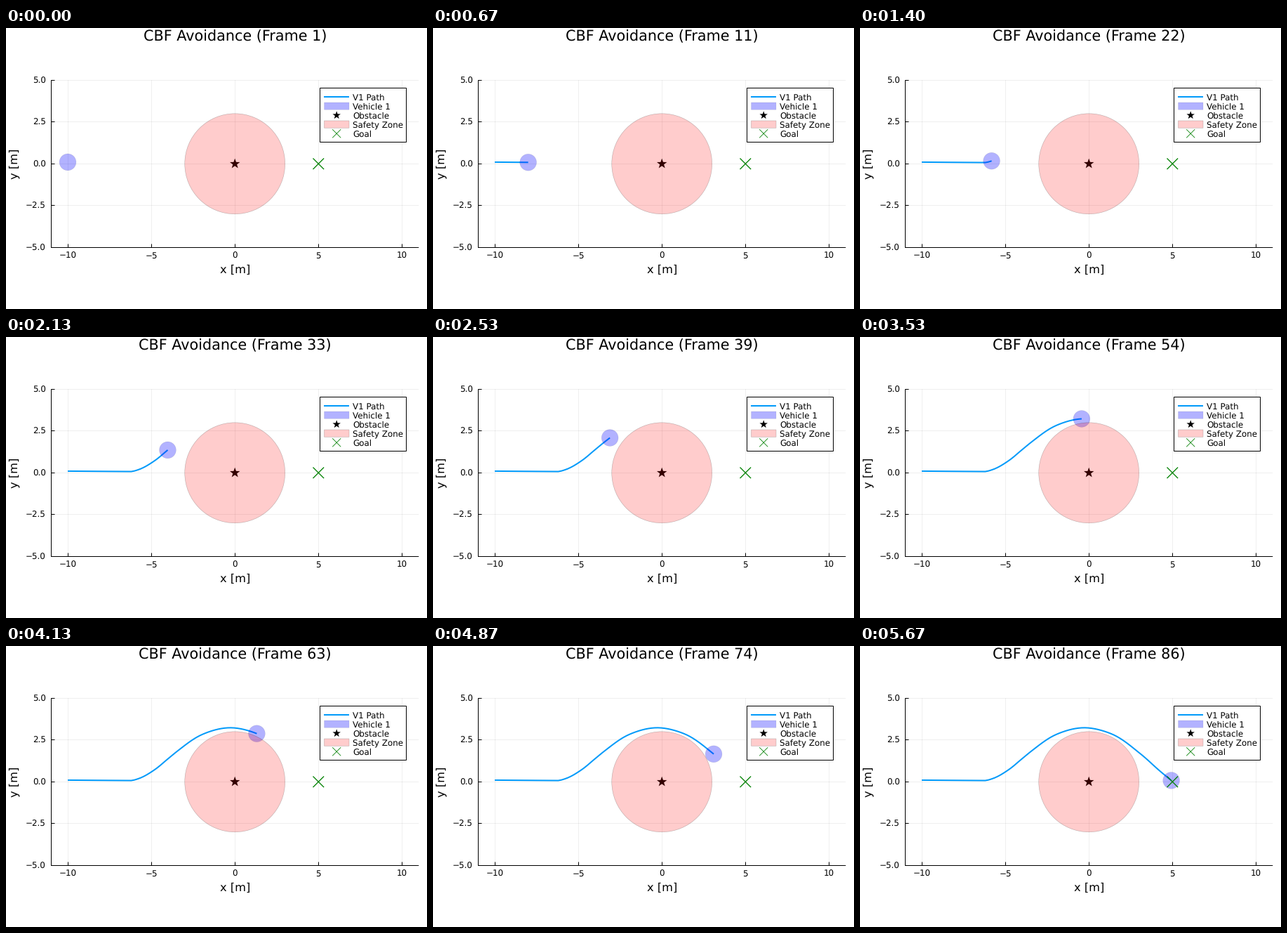
A matplotlib script for the animation above (5740 ms loop, 600x400 px).

```python
import numpy as np
import matplotlib.pyplot as plt
from matplotlib.animation import FuncAnimation
from matplotlib.patches import Circle, Polygon, Rectangle

plt.rcParams.update({"font.family": "DejaVu Sans", "path.snap": False,
                     "text.hinting": "none"})

W, H, DPI = 600, 400, 100
X0, Y0, S = 326.2, 193.3, 23.82      # plot origin and pixels per metre
STEPS, FPS = 86, 15
LOOP, TICK = 5740, 20                # ms
PX = 72 / DPI                        # one pixel in points
BLUE, GREEN = "#009afa", "#008000"

# Vehicle track: step, x, y
KNOTS = np.array([
    (0, -10, .1), (18, -6.4, .076), (19, -6.2, .075), (21, -5.82, .17),
    (27, -4.79, .73), (32, -4.02, 1.36), (36, -3.42, 1.85),
    (45, -1.95, 2.83), (54, -.24, 3.23), (62, 1.31, 2.88),
    (73, 3.1, 1.66), (81, 4.3, .60), (85, 4.93, .08)])


def hermite(t, knots, vals):
    """Smooth curve through the knots with finite-difference slopes."""
    m = np.gradient(vals, knots)
    i = np.clip(np.searchsorted(knots, t, "right") - 1, 0, len(knots) - 2)
    h = knots[i + 1] - knots[i]
    u = (t - knots[i]) / h
    return ((1 + 2 * u) * (1 - u) ** 2 * vals[i] + u * (1 - u) ** 2 * h * m[i]
            + u * u * (3 - 2 * u) * vals[i + 1]
            + u * u * (u - 1) * h * m[i + 1])


def sx(x):
    return X0 + S * x


def sy(y):
    return Y0 - S * y


def mid(v):
    return np.floor(v) + .5


steps = np.arange(STEPS)
track_x = sx(hermite(steps, KNOTS[:, 0], KNOTS[:, 1]))
track_y = sy(hermite(steps, KNOTS[:, 0], KNOTS[:, 2]))

fig = plt.figure(figsize=(W / DPI, H / DPI), dpi=DPI, facecolor="white")
ax = fig.add_axes([0, 0, 1, 1])
ax.set(xlim=(0, W), ylim=(H, 0))
ax.axis("off")


def line(xs, ys, color="black", w=1.0, z=1, **kw):
    kw.setdefault("solid_capstyle", "butt")
    return ax.plot(xs, ys, color=color, lw=w * PX, zorder=z, **kw)[0]


def text(x, y, s, size, ha="center", **kw):
    return ax.text(x, y, s, fontsize=size * PX, ha=ha,
                   va=kw.pop("va", "baseline"), zorder=12, **kw)


def star(x, y, r, z):
    a = np.arange(10) * np.pi / 5
    rad = np.where(np.arange(10) % 2, .4 * r, r)
    pts = np.column_stack([x + rad * np.sin(a), y - rad * np.cos(a)])
    ax.add_patch(Polygon(pts, fc="black", ec="none", zorder=z))


def cross(x, y, r, w, z):
    for d in (r, -r):
        line([x - r, x + r], [y - d, y + d], GREEN, w, z)


def shade(patch, fill, edge, z):
    patch.set(facecolor=fill, edgecolor=(0, 0, 0, edge), linewidth=.6 * PX,
              zorder=z)
    return ax.add_patch(patch)


VEHICLE = ((0, 0, 1, .3), .1)
ZONE = ((1, 0, 0, .2), .25)

# Axes, grid and tick labels
left, right = mid(sx(-11)), sx(11)
top, bottom = sy(5), mid(sy(-5))
for v in (-10, -5, 0, 5, 10):
    x = mid(sx(v))
    line([x, x], [top, bottom], w=.8, alpha=.08)
    line([x, x], [bottom, bottom - 5], z=2)
    text(sx(v), 328.2, f"{v}".replace("-", "−"), 11.9)
for v in (-5, -2.5, 0, 2.5, 5):
    y = mid(sy(v))
    line([left, right], [y, y], w=.8, alpha=.08)
    line([left, left + 5], [y, y], z=2)
    text(56.8, sy(v) + 4.4, f"{v:.1f}".replace("-", "−"), 11.9, ha="right")
line([left, left], [top, bottom + .5], z=2)
line([left - .5, right], [bottom, bottom], z=2)
text(X0 + .3, 348.5, "x [m]", 16.3)
text(16.7, Y0 - .3, "y [m]", 16.3, ha="right", va="center", rotation=90,
     rotation_mode="default").set(ha="center", va="baseline",
                                  rotation_mode="anchor")
title = text(X0 + .2, 18.3, "", 20.8)

# Scene
path = line([], [], BLUE, 2, 3, solid_joinstyle="round")
car = shade(Circle((0, 0), .5 * S), *VEHICLE, 4)
star(X0, Y0, 7.6, 5)
shade(Circle((X0, Y0), 3 * S), *ZONE, 6)
cross(sx(5), Y0, 7.8, 1.3, 7)

# Legend
ax.add_patch(Rectangle((447.5, 85.5), 123, 77, fc="white", ec="black",
                       lw=PX, zorder=10))
rows = 98 + 13 * np.arange(5)
names = ("V1 Path", "Vehicle 1", "Obstacle", "Safety Zone", "Goal")
for y, name in zip(rows, names):
    text(494, y + 4.5, name, 11.9, ha="left")
line([453, 489], [rows[0], rows[0]], BLUE, 2, 11)
for y, style in ((rows[1], VEHICLE), (rows[3], ZONE)):
    shade(Rectangle((453.5, y - 5), 35.5, 10.3), *style, 11)
star(471.2, rows[2] + .3, 6, 11)
cross(471.2, rows[4] + .3, 6, .8, 11)


def draw(k):
    t = k * TICK + TICK / 2
    n = min(int((t + 4) * FPS / 1000), STEPS - 1)
    path.set_data(track_x[:n + 1], track_y[:n + 1])
    car.center = track_x[n], track_y[n]
    title.set_text(f"CBF Avoidance (Frame {n + 1})")
    return path, car, title


anim = FuncAnimation(fig, draw, frames=LOOP // TICK, interval=TICK,
                     init_func=lambda: draw(0), repeat=True, repeat_delay=0,
                     blit=False)
plt.show()
```
